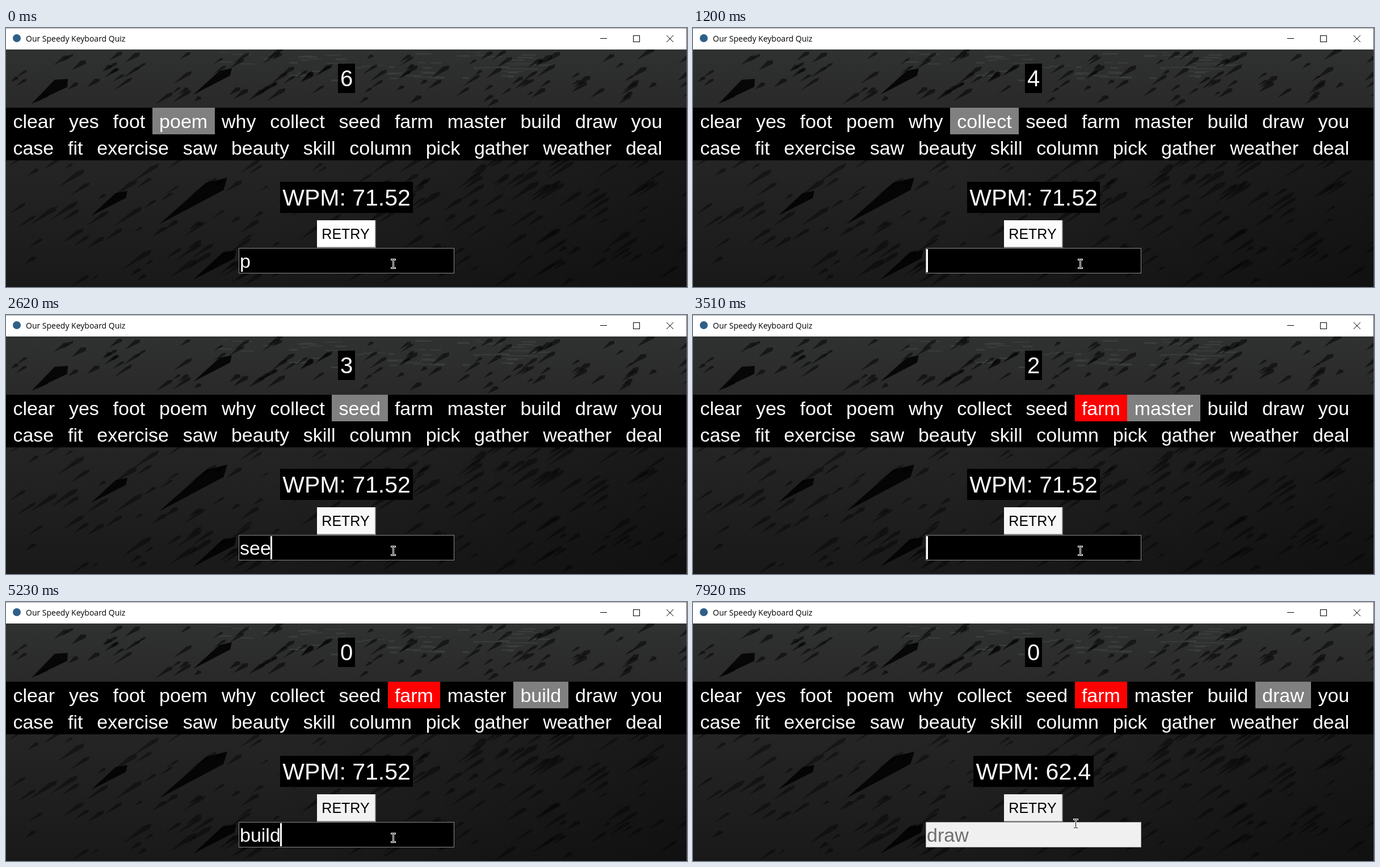
An HTML page with a canvas that plays this animation: 1200 px wide and 458 px high, repeating every 8000 ms.

```html
<!DOCTYPE html>
<html lang="en">
<head>
<meta charset="utf-8">
<title>Our Speedy Keyboard Quiz</title>
<style>
  html, body { margin: 0; width: 100%; height: 100%; overflow: hidden; background: #1c1c1c; }
  canvas { display: block; }
</style>
</head>
<body>
<canvas id="stage" width="1200" height="458"></canvas>
<script>
const W = 1200, H = 458, LOOP = 8000, END = 6220, MOVE = 7920;
const FIRST = 280, STEP = 145.5, WORD = 34, GAP = 24.8;
const SANS = '"Liberation Sans", Arial, sans-serif';
const ctx = document.getElementById('stage').getContext('2d');

const upper = 'clear yes foot poem why collect seed farm master build draw you'.split(' ');
const lower = 'case fit exercise saw beauty skill column pick gather weather deal'.split(' ');

// Letters typed in each step; a space hands in the word
const strokes = 'p|oe|m| |w|h|y| |c|o|ll|e|ct|| s|e||e|d| |f|a|r| |m|a|s|t|e|r| |b|u||il|d| |d|r|a|w'.split('|');
const START_WORD = 3;

function box(c, x, y, w, h, color) {
  c.fillStyle = color;
  c.fillRect(x, y, w, h);
}

function label(c, str, x, y, size, color = '#fff', align = 'left', family = SANS) {
  c.font = size + 'px ' + family;
  c.textAlign = align;
  c.fillStyle = color;
  c.fillText(str, x, y);
}

// Places words one after the other, each in a padded cell
function layOut(row) {
  ctx.font = WORD + 'px ' + SANS;
  let x = 0;
  return row.map(word => {
    const cell = { word, x, w: ctx.measureText(word).width + GAP };
    x += cell.w;
    return cell;
  });
}

function random(seed) {
  return () => (seed = (seed * 16807) % 2147483647) / 2147483647;
}

// Slanted shadow: long tail at the lower left, blunt head at the upper right
function shadow(c, x, y, len, wide, alpha) {
  const dx = len * 0.8, dy = -len * 0.55;
  c.fillStyle = `rgba(0,0,0,${alpha})`;
  c.beginPath();
  c.moveTo(x, y);
  c.lineTo(x + dx * 0.75 - wide * 0.4, y + dy * 0.8 - wide * 0.4);
  c.lineTo(x + dx, y + dy);
  c.lineTo(x + dx * 0.9 + wide * 0.3, y + dy * 0.8 + wide * 0.3);
  c.closePath();
  c.fill();
}

function drawLand(c) {
  const down = c.createLinearGradient(0, 38, 0, H);
  down.addColorStop(0, '#303131');
  down.addColorStop(0.25, '#292929');
  down.addColorStop(0.6, '#222222');
  down.addColorStop(1, '#191919');
  box(c, 0, 38, W, H - 38, down);
  const side = c.createLinearGradient(450, 0, W, 0);
  side.addColorStop(0, 'rgba(0,0,0,0)');
  side.addColorStop(1, 'rgba(0,0,0,.35)');
  box(c, 450, 234, W - 450, H - 234, side);

  const rnd = random(71);
  for (let i = 0; i < 60; i++)
    box(c, 370 + rnd() * 560, 42 + rnd() * 50, 8 + rnd() * 30, 1 + rnd() * 2, '#3b3e3e');
  for (let i = 0; i < 110; i++)
    shadow(c, rnd() * W, 55 + rnd() * 85, 12 + rnd() * 30, 3 + rnd() * 5, 0.5);
  for (let i = 0; i < 190; i++)
    shadow(c, rnd() * W, 245 + rnd() * 215, 15 + rnd() * 50, 2 + rnd() * 5, 0.4);
  const large = [[45, 134, 80, 18], [330, 118, 85, 12], [150, 332, 80, 12], [270, 347, 150, 18], [330, 445, 95, 14]];
  for (const [x, y, len, wide] of large) shadow(c, x, y, len, wide, 0.85);
}

function drawTitleBar(c) {
  box(c, 0, 0, W, 38, '#fff');
  box(c, 0, 0, W, 1, '#a0a0a0');
  c.fillStyle = '#2f5f88';
  c.beginPath();
  c.arc(19, 18, 7, 0, 7);
  c.fill();
  label(c, 'Our Speedy Keyboard Quiz', 35, 24, 14, '#000', 'left', '"Open Sans", "Noto Sans", sans-serif');
  box(c, 1047, 18, 12, 1, '#000');
  c.strokeStyle = '#000';
  c.lineWidth = 1;
  c.strokeRect(1105.5, 13.5, 11, 11);
  c.beginPath();
  c.moveTo(1164, 13); c.lineTo(1176, 25);
  c.moveTo(1176, 13); c.lineTo(1164, 25);
  c.stroke();
}

const cells = layOut(upper);
const still = document.createElement('canvas');
still.width = W;
still.height = H;
const back = still.getContext('2d');
drawLand(back);
drawTitleBar(back);
box(back, 0, 141, W, 93, '#000');
for (const { word, x } of layOut(lower)) label(back, word, x + GAP / 2, 224, WORD);
box(back, 1199, 0, 1, H, '#555');

// Everything the typist has done by time t
function typing(t) {
  const step = Math.min(strokes.length - 1, Math.max(0, Math.floor((t - FIRST) / STEP) + 1));
  const tried = strokes.slice(0, step + 1).join('').split(' ');
  const time = step ? FIRST + (step - 1) * STEP : 0;
  return { tried, time, text: tried[tried.length - 1], index: START_WORD + tried.length - 1 };
}

function drawWords({ tried, index }) {
  cells.forEach(({ word, x, w }, i) => {
    const wrong = i >= START_WORD && i < index && tried[i - START_WORD] !== word;
    const left = Math.round(x), color = i === index ? '#808080' : wrong && '#f00';
    if (color) box(ctx, left, 141, Math.round(x + w) - left, 47, color);
    label(ctx, word, x + GAP / 2, 177, WORD);
  });
}

function drawScore(time, done) {
  const left = Math.max(0, 6 - Math.floor((time + 850) / 1000));
  box(ctx, 585, 63, 30, 52, '#000');
  label(ctx, left, 600, 103, 40, '#fff', 'center');
  const wide = done ? 212 : 234;
  box(ctx, 600 - wide / 2, 272, wide, 55, '#000');
  label(ctx, 'WPM: ' + (done ? '62.4' : '71.52'), 600, 314, 41, '#fff', 'center');
}

function drawButton(t) {
  const shade = Math.round(255 - 15 * Math.min(1, t / END));
  box(ctx, 548, 340, 104, 49, '#696969');
  box(ctx, 548, 340, 103, 48, '#a0a0a0');
  box(ctx, 548, 340, 102, 47, `rgb(${shade},${shade},${shade})`);
  label(ctx, 'RETRY', 598.5, 373, 25, '#000', 'center');
}

function drawEntry({ text, time }, done) {
  box(ctx, 410, 389, 380, 45, done ? '#a0a0a0' : '#8a8a8a');
  box(ctx, 411, 390, 378, 43, done ? '#f0f0f0' : '#000');
  label(ctx, text, 412, 424, WORD, done ? '#6d6d6d' : '#fff');
  const lit = (time + 660) % 900 < 600;
  if (!done && lit) box(ctx, 411 + Math.round(ctx.measureText(text).width), 391, 3, 41, '#fff');
}

function drawPointer(x, y) {
  const beam = (grow, color) => {
    const part = (dx, dy, w, h) =>
      box(ctx, x + dx - grow, y + dy - grow, w + 2 * grow, h + 2 * grow, color);
    for (const dy of [-8, 7]) {
      part(-3, dy, 3, 1);
      part(1, dy, 3, 1);
    }
    part(0, -7, 1, 14);
  };
  beam(1, '#fff');
  beam(0, '#000');
}

function draw() {
  const t = performance.now() % LOOP, done = t >= END, state = typing(t);
  ctx.drawImage(still, 0, 0);
  drawWords(state);
  drawScore(state.time, done);
  drawButton(t);
  drawEntry(state, done);
  if (t < MOVE) drawPointer(682, 417);
  else drawPointer(674, 392);
  requestAnimationFrame(draw);
}
draw();
</script>
</body>
</html>
```
